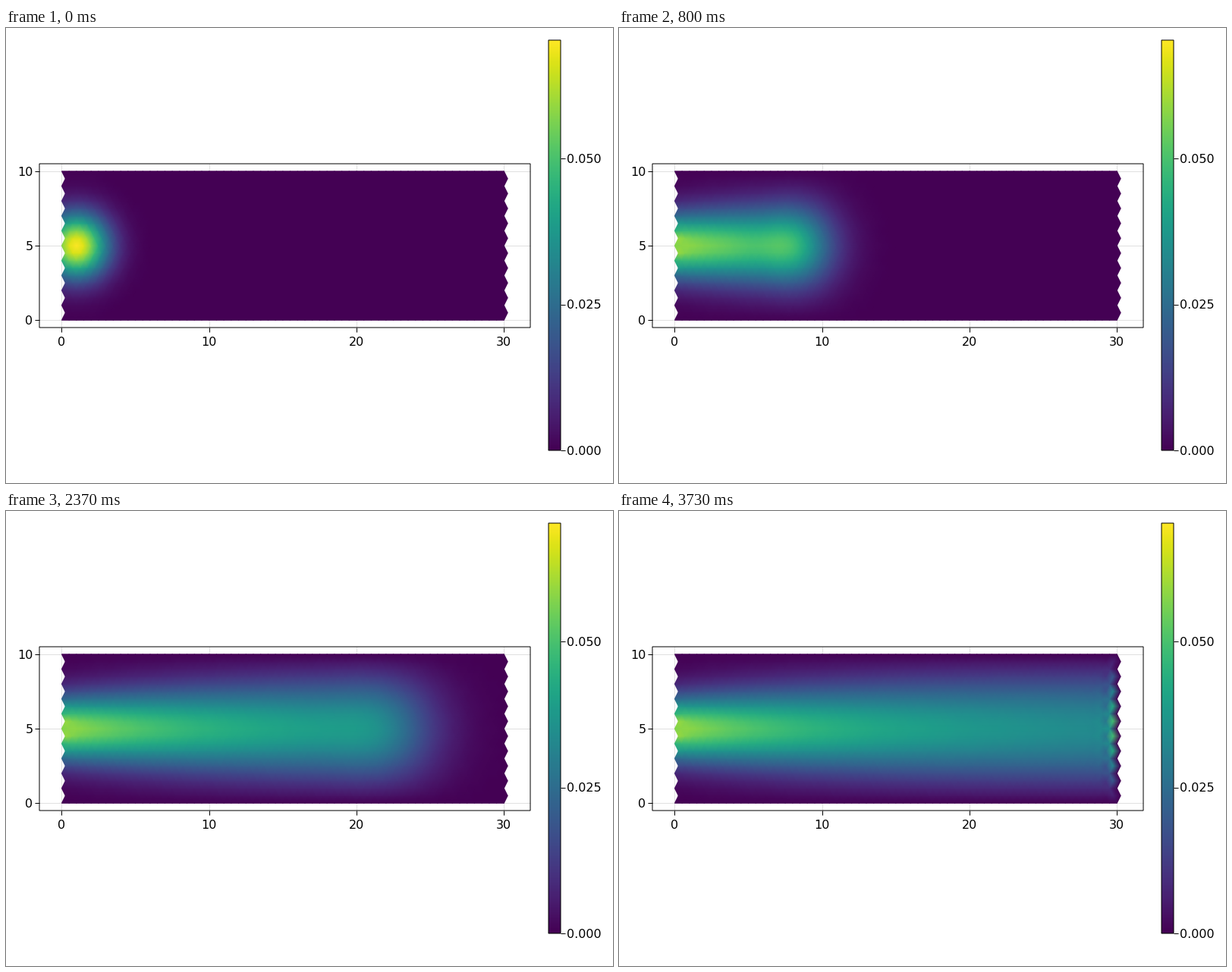
These frames come from a looping animation (800 by 600 pixels, 5010 ms). A matplotlib script:

```python
import numpy as np
import matplotlib.pyplot as plt
from matplotlib.animation import FuncAnimation
from matplotlib.patches import Rectangle
from matplotlib.tri import Triangulation

WIDTH, HEIGHT, DPI = 800, 600, 100
PX = 72 / DPI
FRAMES, INTERVAL = 167, 30
STEPS_PER_SECOND, LAST_STEP = 30, 112

NX, NY, H = 61, 21, 0.5
SPEED, DIFFUSION = 0.3, 0.027    # per step
SUBSTEPS = 4
PEAK, VMAX = 0.0707, 0.07026

plt.rcParams["font.family"] = "DejaVu Sans"
plt.rcParams["font.size"] = 16 * PX


def build_mesh():
    """Triangular lattice with every other row shifted by half a cell."""
    j, i = np.mgrid[:NY, :NX]
    x = H * i + H / 2 * (j % 2)
    y = H * j
    tris = []
    for row in range(NY - 1):
        for col in range(NX - 1):
            a = row * NX + col
            b, c, d = a + 1, a + NX, a + NX + 1
            tris += [(a, b, d), (a, d, c)] if row % 2 else [(a, b, c), (b, d, c)]
    edge = (i == 0) | (i == NX - 1) | (j == 0) | (j == NY - 1)
    return x.ravel(), y.ravel(), np.array(tris), edge.ravel()


def build_propagator(x, y, tris, edge):
    """One Crank-Nicolson step of advection-diffusion with linear elements."""
    tx, ty = x[tris], y[tris]
    gx = np.roll(ty, -1, 1) - np.roll(ty, -2, 1)
    gy = np.roll(tx, -2, 1) - np.roll(tx, -1, 1)
    area = np.sum(tx * gx, axis=1) / 2
    gx, gy = (g / (2 * area[:, None]) for g in (gx, gy))

    n = len(x)
    rate, mass = np.zeros((n, n)), np.zeros(n)
    for p in range(3):
        np.add.at(mass, tris[:, p], area / 3)
        for q in range(3):
            stiffness = area * (gx[:, p] * gx[:, q] + gy[:, p] * gy[:, q])
            drift = area / 3 * gx[:, q]
            np.add.at(rate, (tris[:, p], tris[:, q]),
                      -DIFFUSION * stiffness - SPEED * drift)
    rate /= mass[:, None]
    rate[edge] = 0    # boundary values stay fixed
    half = rate / (2 * SUBSTEPS)
    eye = np.eye(n)
    return np.linalg.matrix_power(np.linalg.solve(eye - half, eye + half), SUBSTEPS)


def simulate(x, y, tris, edge):
    propagator = build_propagator(x, y, tris, edge)
    states = [PEAK * np.exp(-((x - 1) ** 2 + (y - 5) ** 2) / 4.5)]
    for _ in range(LAST_STEP):
        states.append(propagator @ states[-1])
    return states


def px_x(x):
    return 73.4 + 19.43 * x


def px_y(y):
    return 385.3 - 19.65 * y


def line(xs, ys, color="black", z=4):
    ax.plot(xs, ys, color=color, lw=PX, zorder=z, solid_capstyle="butt")


def label(x, y, text, align):
    ax.text(x, y + 5.8, text, ha=align, va="baseline", color="black")


def outline(left, top, right, bottom):
    ax.add_patch(Rectangle((left, top), right - left, bottom - top, fill=False,
                           ec="black", lw=PX, zorder=4, snap=False))


x, y, tris, edge = build_mesh()
states = simulate(x, y, tris, edge)

fig = plt.figure(figsize=(WIDTH / DPI, HEIGHT / DPI), dpi=DPI, facecolor="white")
ax = fig.add_axes([0, 0, 1, 1])
ax.axis("off")

LEFT, TOP, RIGHT, BOTTOM = 44, 179, 691, 395
for value in (0, 10, 20, 30):
    u = px_x(value)
    line([u, u], [TOP, BOTTOM], "#e0e0e0", 1)
    line([u, u], [BOTTOM, BOTTOM + 6])
    label(u, 413, str(value), "center")
for value in (0, 5, 10):
    v = px_y(value)
    line([LEFT, RIGHT], [v, v], "#e0e0e0", 1)
    line([LEFT - 6, LEFT], [v, v])
    label(35.5, v, str(value), "right")
outline(LEFT, TOP, RIGHT, BOTTOM)

field = ax.tripcolor(Triangulation(px_x(x), px_y(y), tris), states[0],
                     shading="gouraud", cmap="viridis", vmin=0, vmax=VMAX, zorder=2)

BAR_TOP, BAR_BOTTOM = 16, 557
ax.imshow(np.linspace(0, 1, 256)[:, None], cmap="viridis", origin="lower",
          extent=(715, 731, BAR_BOTTOM, BAR_TOP), aspect="auto",
          interpolation="bilinear", zorder=2)
outline(715, BAR_TOP, 731, BAR_BOTTOM)
for value in (0, 0.025, 0.05):
    v = BAR_BOTTOM - (BAR_BOTTOM - BAR_TOP) * value / VMAX
    line([731, 737], [v, v])
    label(739.5, v, f"{value:.3f}", "left")

ax.set_xlim(0, WIDTH)
ax.set_ylim(HEIGHT, 0)


def update(frame):
    step = (frame * INTERVAL + 20) * STEPS_PER_SECOND // 1000
    field.set_array(states[min(step, LAST_STEP)])
    return (field,)


animation = FuncAnimation(fig, update, frames=FRAMES, interval=INTERVAL,
                          repeat=True, repeat_delay=0, blit=False)
plt.show()
```
